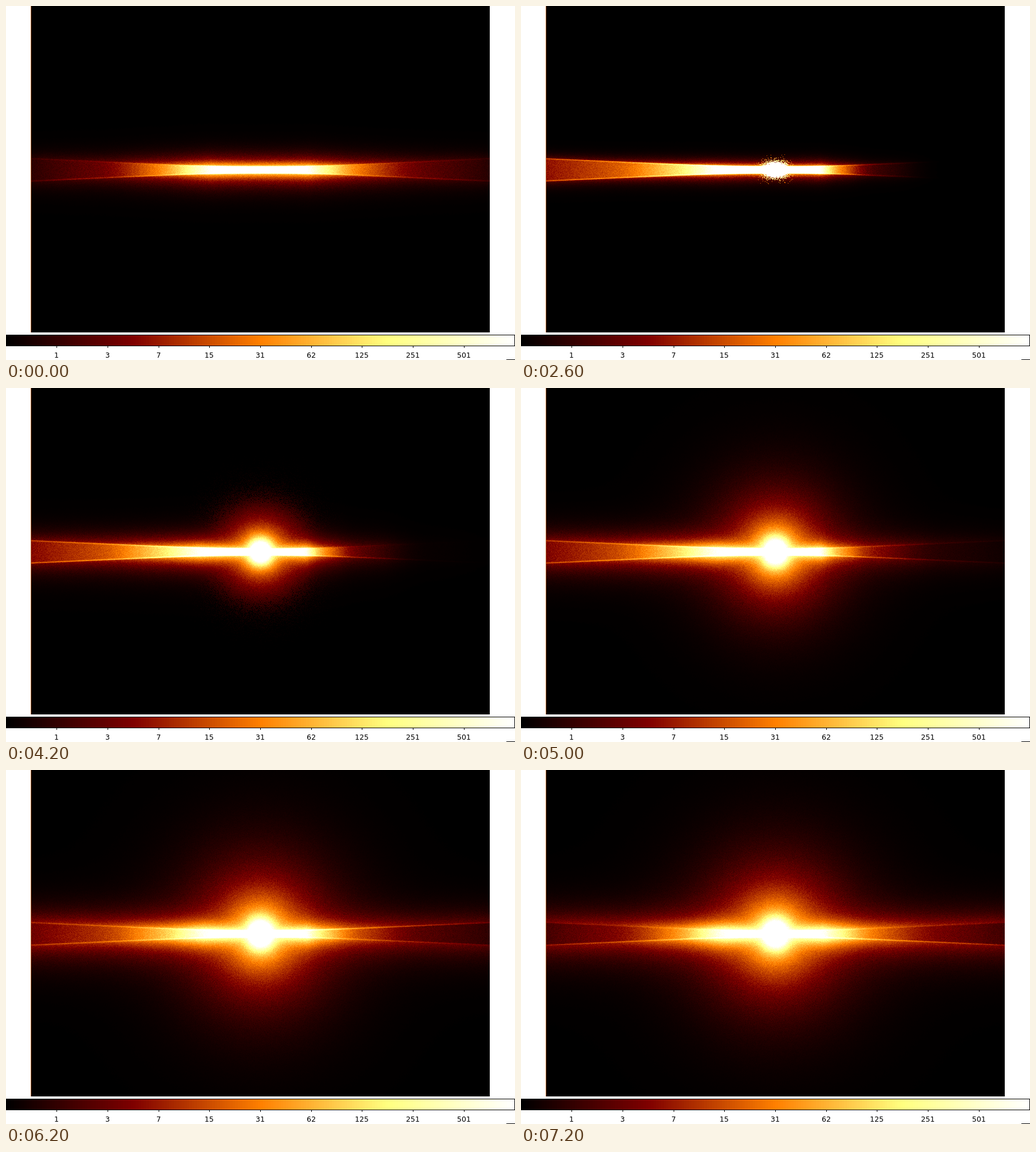
Animation, 887 px wide and 616 px high, one loop 7.4 s. Source, as an HTML page with a canvas:

```html
<!DOCTYPE html>
<html lang="en">
<head>
<meta charset="utf-8">
<style>
html, body { margin: 0; width: 100%; height: 100%; overflow: hidden; background: #fff; }
canvas { display: block; }
</style>
</head>
<body>
<canvas id="stage" width="887" height="616"></canvas>
<script>
const ctx = document.getElementById('stage').getContext('2d');
const LEFT = 43, W = 800, H = 568, MID_X = 400, MID_Y = 284.6;
const STEP = 200, LOOP = 7400, LOG = Math.log(1000);

// Brightness along the beam is given at these distances from the centre.
const NODES = [0.19, 0.25, 0.4, 0.65, 1.01];

// Brightness is on the log scale of the colour bar, 0 to 1.
// line: edge highlights, upper left, lower left, upper right, lower right.
// halo: falloff outside the beam, extra haze.
// glow: amplitude, falloff, core size, horizontal scale, visible radius.
const KEYS = [
  { at: 0, left: [.92, .57, .22, .08], right: [.86, .52, .21, .07],
    line: [.06, .13, .06, .11], halo: [14, .03], glow: [.85, 40, 14, .6, 0] },
  { at: 1000, left: [1, .65, .33, .17], right: [.78, .36, .1, .02],
    line: [.13, .16, .12, .12], halo: [12, .02], glow: [.85, 40, 14, .6, 0] },
  { at: 2600, left: [1.03, .74, .44, .27], right: [.62, .14, 0, 0],
    line: [.18, .2, .14, .14], halo: [8, .01], glow: [.85, 40, 14, .6, 16] },
  { at: 4200, left: [1.03, .74, .42, .25], right: [.62, .2, .02, 0],
    line: [.16, .2, .03, .14], halo: [17, .03], glow: [.9, 48, 20, 1, 110] },
  { at: 5600, left: [1, .7, .4, .23], right: [.7, .36, .12, .05],
    line: [.12, .15, .13, .16], halo: [22, .08], glow: [.85, 84, 25, 1.1, 600] },
  { at: 6600, left: [.98, .64, .34, .19], right: [.82, .46, .22, .11],
    line: [.08, .1, .18, .06], halo: [26, .12], glow: [.85, 79, 25, 1.05, 600] },
  { at: 7200, left: [.95, .57, .26, .13], right: [.87, .51, .25, .12],
    line: [.04, .13, .05, .15], halo: [26, .13], glow: [.85, 82, 25, 1.05, 600] }
];

const clamp = (v, lo = 0, hi = 1) => Math.min(hi, Math.max(lo, v));
const mix = (a, b, f) => Array.isArray(a) ? a.map((v, i) => mix(v, b[i], f)) : a + (b - a) * f;

function stateAt(ms) {
  let i = 0;
  while (i < KEYS.length - 2 && ms >= KEYS[i + 1].at) i++;
  const a = KEYS[i], b = KEYS[i + 1], f = clamp((ms - a.at) / (b.at - a.at));
  const state = {};
  for (const name in a) state[name] = mix(a[name], b[name], f);
  return state;
}

function along(side, u) {
  if (u <= NODES[0]) return 1.06;
  const values = [1.06, ...side];
  let i = 0;
  while (i < 3 && u > NODES[i + 1]) i++;
  return Math.max(0, mix(values[i], values[i + 1], (u - NODES[i]) / (NODES[i + 1] - NODES[i])));
}

// Averaging neighbours rounds off the corners at the nodes.
function smoothAlong(side, u) {
  const reach = 0.2 * u;
  let sum = 0;
  for (let i = -2; i <= 2; i++) sum += along(side, u + reach * i / 4);
  return sum / 5;
}

const heat = t => [2 * t, 2 * t - 0.5, 2 * t - 1].map(c => Math.round(255 * clamp(c)));
const palette = Uint32Array.from({ length: 256 }, (_, i) => {
  const [r, g, b] = heat(i / 255);
  return (255 << 24 | b << 16 | g << 8 | r) >>> 0;
});

function randomizer(seed) {
  let s = seed * 7919 + 12345 | 0;
  return () => {
    s ^= s << 13; s ^= s >>> 17; s ^= s << 5;
    return (s >>> 0) / 4294967296;
  };
}

const image = ctx.createImageData(W, H);
const pixels = new Uint32Array(image.data.buffer);

function drawField(step) {
  const s = stateAt(step * STEP), random = randomizer(step + 1);
  const [reach, haze] = s.halo;
  const [amp, fall, coreSize, scaleX, radius] = s.glow;
  const share = 0.5 + 0.01 * reach;
  for (let x = 0; x < W; x++) {
    const dx = x - MID_X, u = Math.abs(dx) / MID_X, onRight = dx > 0;
    const inside = smoothAlong(onRight ? s.right : s.left, u);
    const half = Math.pow(Math.pow(1.6 + 17.9 * u, 4) + 1300, 0.25);
    const outside = Math.min(share, inside * share) + haze * Math.min(1, inside * 10);
    const lineGain = Math.min(1, inside * 6);
    for (let y = 0; y < H; y++) {
      const dy = y - MID_Y, below = dy > 0, d = Math.abs(dy) - half;
      const noise = random() + random() - 1;
      const halo = outside * Math.exp(-Math.max(0, d) / (reach * (below ? 1.05 : 0.9)));
      let t = mix(inside, halo, clamp((d + 1) / 2));
      if (d > -4 && d < 4)
        t += s.line[(onRight ? 2 : 0) + (below ? 1 : 0)] * lineGain * Math.exp(-d * d / 1.3);
      if (radius > 0) {
        const r = Math.hypot(dx * scaleX, dy);
        if (r * (1 + 0.45 * noise) < radius) {
          const core = r < 3 * coreSize ? 0.7 * Math.exp(-((r / coreSize) ** 2)) : 0;
          const glow = amp * Math.exp(-Math.pow(r / fall, 1.2)) + core;
          t = Math.log(Math.exp(LOG * t) + Math.exp(LOG * glow) - 1) / LOG;
        }
      }
      t += noise * Math.min(0.3 * t, 0.055);
      pixels[y * W + x] = palette[Math.round(255 * clamp(t))];
    }
  }
  ctx.putImageData(image, LEFT, 0);
  ctx.fillStyle = '#be6e32';
  ctx.fillRect(LEFT, 0, 1, H);
}

function drawScale() {
  ctx.fillStyle = '#fff';
  ctx.fillRect(0, 0, 887, 616);
  for (let x = 0; x < 886; x++) {
    ctx.fillStyle = `rgb(${heat(Math.floor(x / 886 * 200) / 199)})`;
    ctx.fillRect(x, 573, 1, 18);
  }
  ctx.fillStyle = '#000';
  ctx.fillRect(0, 572, 887, 1);
  ctx.fillRect(0, 591, 887, 1);
  ctx.fillRect(886, 572, 1, 20);
  ctx.fillRect(872, 615, 15, 1);
  ctx.font = '12.5px "DejaVu Sans", sans-serif';
  ctx.textAlign = 'center';
  for (let i = 1; i < 10; i++) {
    const x = Math.floor(i * 88.7);
    ctx.fillRect(x, 592, 1, 3);
    ctx.fillText(Math.round(1.0015 * (Math.pow(1000, i / 10) - 1)), x, 612);
  }
}

let shown = -1;
const start = performance.now();
function tick() {
  const step = Math.floor((performance.now() - start) % LOOP / STEP);
  if (step !== shown) drawField(shown = step);
  requestAnimationFrame(tick);
}
drawScale();
tick();
</script>
</body>
</html>
```
